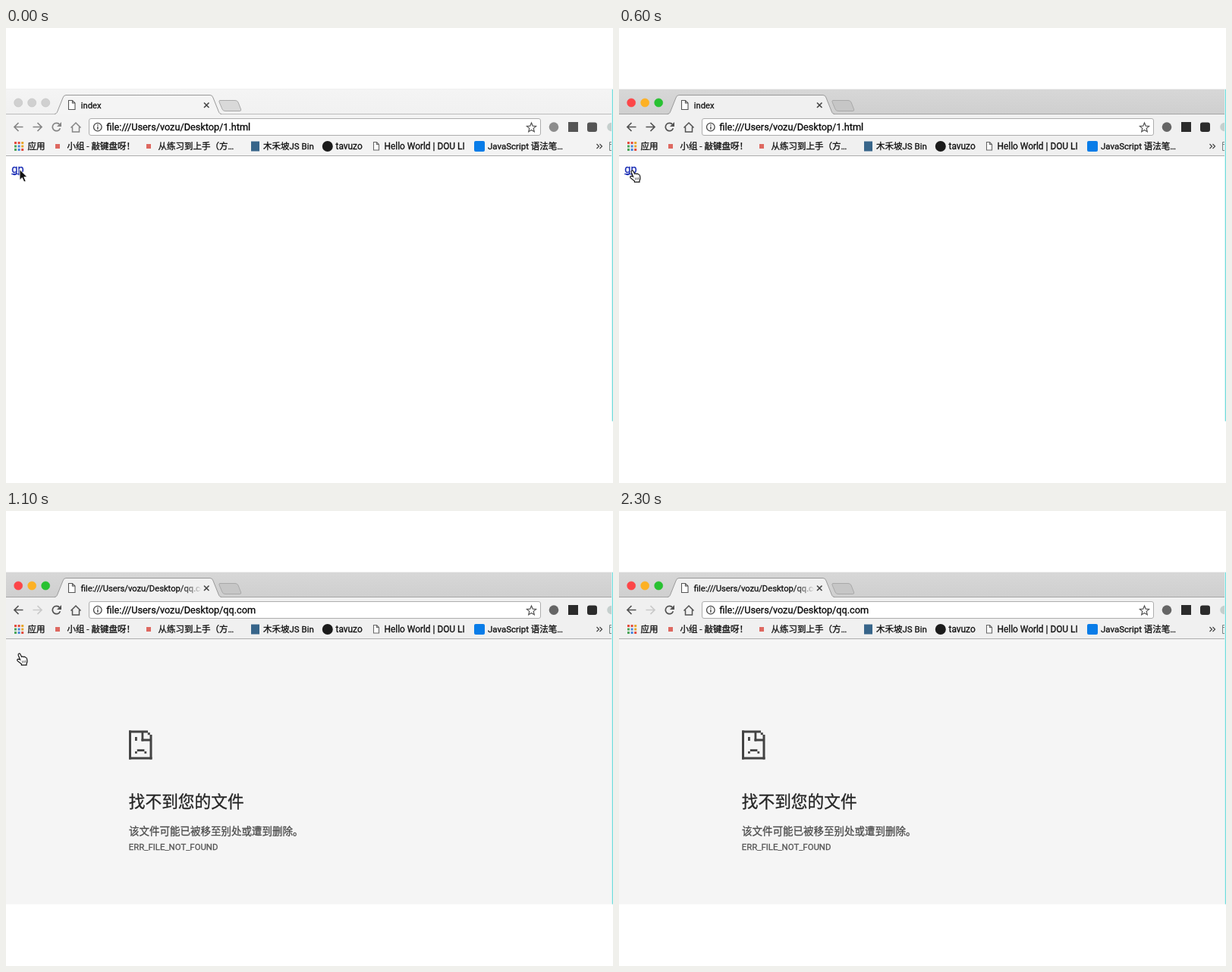
An HTML page with a canvas that plays this animation: 800 px wide and 600 px high, repeating every 2400 ms.

```html
<!DOCTYPE html>
<html lang="zh-CN">
<head>
<meta charset="utf-8">
<title>index</title>
<style>
html, body { margin: 0; width: 100%; height: 100%; overflow: hidden; background: #fff; }
canvas { display: block; }
</style>
</head>
<body>
<canvas id="stage" width="800" height="600"></canvas>
<script>
const ctx = document.getElementById('stage').getContext('2d');
const LOOP = 2400;
const SANS = 'Roboto, "Noto Sans CJK SC", "Noto Sans CJK", "Noto Sans CJK JP", sans-serif';

// Event times in ms
const AT = { press: 100, release: 600, error: 900, title: 1000, hide: 2300 };

function rect(x, y, w, h, color) {
  ctx.fillStyle = color;
  ctx.fillRect(x, y, w, h);
}

// A hairline stroke gives the slightly heavy look of system text
function text(str, x, y, size, color = '#111') {
  ctx.font = `${size}px ${SANS}`;
  ctx.fillStyle = ctx.strokeStyle = color;
  ctx.lineWidth = 0.3;
  ctx.fillText(str, x, y);
  ctx.strokeText(str, x, y);
}

function shape(path, fill, stroke, width = 1) {
  const p = new Path2D(path);
  if (fill) { ctx.fillStyle = fill; ctx.fill(p); }
  if (stroke) { ctx.strokeStyle = stroke; ctx.lineWidth = width; ctx.stroke(p); }
}

function circle(x, y, r, fill, stroke, width = 1) {
  ctx.beginPath();
  ctx.arc(x, y, r, 0, Math.PI * 2);
  if (fill) { ctx.fillStyle = fill; ctx.fill(); }
  if (stroke) { ctx.strokeStyle = stroke; ctx.lineWidth = width; ctx.stroke(); }
}

function box(x, y, w, h, r, fill, stroke) {
  ctx.beginPath();
  ctx.roundRect(x, y, w, h, r);
  if (fill) { ctx.fillStyle = fill; ctx.fill(); }
  if (stroke) { ctx.strokeStyle = stroke; ctx.lineWidth = 1; ctx.stroke(); }
}

function page(x, y, w, h, color) {
  const f = w * 0.42;
  shape(`M${x} ${y}h${w - f}l${f} ${f}v${h - f}h${-w}z M${x + w - f} ${y}v${f}h${f}`, '#fff', color, 1.1);
}

function tabBar(active, title) {
  const g = ctx.createLinearGradient(0, 81, 0, 114);
  g.addColorStop(0, active ? '#d7d7d7' : '#f4f4f4');
  g.addColorStop(1, active ? '#cfcfcf' : '#f1f1f1');
  rect(0, 81, 800, 33, g);
  rect(0, 113, 800, 1, active ? '#a5a5a5' : '#bdbdbd');

  const lights = active ? ['#fc4648', '#fdb124', '#28c131'] : ['#d0d0d0', '#d0d0d0', '#d0d0d0'];
  lights.forEach((c, i) => circle(16.2 + 18 * i, 98.5, 5.5, c, active ? c : '#c2c2c2', 0.6));

  shape('M64 114C67 113 67.5 111 69 107L75 92Q76 88.5 79 88.5H269Q272 88.5 273 92L279 107C280.5 111 281 113 284 114z',
    active ? '#f0f0f0' : '#f4f4f4');
  shape('M64 113.5C67 113 67.5 111 69 107L75 92Q76 88.5 79 88.5H269Q272 88.5 273 92L279 107C280.5 111 281 113 284 113.5',
    null, '#999');
  shape('M282 95.5H302Q305 95.5 306 98L309.5 107Q310.5 109.5 308 109.5H289Q286 109.5 285 107L281 97.5Q280.5 95.5 282 95.5z',
    active ? '#c6c6c6' : '#d9d9d9', '#a9a9a9');

  page(82.5, 95.5, 8.5, 12, '#555');
  const fade = ctx.createLinearGradient(228, 0, 258, 0);
  fade.addColorStop(0, '#111');
  fade.addColorStop(1, 'rgba(17,17,17,0)');
  ctx.save();
  ctx.beginPath();
  ctx.rect(95, 90, 162, 22);
  ctx.clip();
  text(title, 98.8, 105.5, 11.2, fade);
  ctx.restore();
  shape('M261 98.5l6.5 6.5m0-6.5l-6.5 6.5', null, '#444', 1.6);
}

function navBar(active, url, canForward) {
  rect(0, 114, 800, 54, active ? '#f0f0f0' : '#f3f3f3');
  rect(0, 168, 800, 1, '#adadad');
  const ink = active ? '#525252' : '#858585';

  shape('M22.5 130.5H11.5M16.5 125l-5.5 5.5l5.5 5.5', null, ink, 1.7);
  shape('M35.5 130.5H46.5M41.5 125l5.5 5.5l-5.5 5.5', null, canForward ? ink : '#c9c9c9', 1.7);
  ctx.beginPath();
  ctx.arc(66.5, 130.5, 5.2, 0.35, 5.5);
  ctx.strokeStyle = ink;
  ctx.lineWidth = 1.7;
  ctx.stroke();
  shape('M73 124v6h-6z', ink);
  shape('M85.5 131.5L92 125l6.5 6.5M87.5 130.5v6.5h9v-6.5', null, ink, 1.5);

  box(109.5, 119.5, 595, 22, 2.5, '#fff', '#adadad');
  circle(120.8, 130.6, 5.3, null, '#444', 1.3);
  rect(120.2, 129.8, 1.4, 4, '#444');
  rect(120.2, 127.2, 1.4, 1.5, '#444');
  text(url, 132.5, 135, 12.7, '#080808');
  shape('M692.5 125l1.7 4.1l4.4 .4l-3.4 2.9l1.1 4.4l-3.8-2.4l-3.8 2.4l1.1-4.4l-3.4-2.9l4.4-.4z', null, '#555', 1.2);

  const dark = active ? '#2b2b2b' : '#555';
  circle(722, 130.6, 6.3, active ? '#656565' : '#8c8c8c');
  rect(741, 124, 13, 13, dark);
  box(766, 124.5, 13, 12.5, 3, dark);
  circle(798, 130.5, 5.8, '#c5cfcd');
}

function bookmarks() {
  const dots = ['#e34b3d', '#e34b3d', '#e7a62c', '#4ca65a', '#4587dc', '#e7a62c', '#4ca65a', '#4587dc', '#e34b3d'];
  dots.forEach((c, i) => rect(11 + (i % 3) * 4.6, 150 + Math.floor(i / 3) * 4.5, 3, 3, c));
  box(65, 153, 6, 6, 0, '#de6860');
  box(185, 153, 6, 6, 0, '#de6860');
  box(323, 149.5, 11, 13, 0, '#37658a');
  circle(423.8, 156, 7, '#1b1b1b');
  page(484.5, 150.5, 7, 10.5, '#666');
  box(617, 149, 14, 14, 2, '#087ce8');

  const items = [
    ['应用', 28.5], ['小组 - 敲键盘呀！', 80.5], ['从练习到上手（方…', 200.5],
    ['木禾坡JS Bin', 339], ['tavuzo', 434.5, 11.9],
    ['Hello World | DOU LI', 498.5, 11.9], ['JavaScript 语法笔…', 635]
  ];
  for (const [label, x, size = 11.5] of items) text(label, x, 159.8, size);
  shape('M778.5 153l3 3l-3 3m4-6l3 3l-3 3', null, '#444', 1.2);
  shape('M801 150.5H795.5V161.5H801M795.5 153.5H801', '#e9eeee', '#7d8585');
}

function errorPage() {
  rect(0, 169, 800, 349.5, '#f5f5f5');
  const c = '#434343';
  // Sad sheet icon, built from blocks: x, y, w, h
  [
    [162, 289.5, 25, 3], [162, 289.5, 3, 38], [162, 324.5, 30.5, 3], [189.5, 295, 3, 32.5],
    [186.8, 292.2, 3, 3], [178.5, 292, 2.8, 11.5], [178.5, 300.5, 12, 3], [170, 298, 2.8, 5],
    [172.8, 314.2, 9.6, 2.8], [170, 317, 2.8, 2.8], [182.4, 317, 2.8, 2.8]
  ].forEach(b => rect(...b, c));
  text('找不到您的文件', 161.8, 391, 21.7, '#252525');
  text('该文件可能已被移至别处或遭到删除。', 162, 427, 13.5, '#4c4c4c');
  text('ERR_FILE_NOT_FOUND', 161.8, 447, 11.4, '#555');
}

function link() {
  text('gp', 7.2, 191, 14.6, '#1c2fb5');
  rect(7, 192, 17, 1, '#1c2fb5');
}

function arrow() {
  shape('M18 186.5V200.5L21.3 197.5L23.8 203L26.2 202L23.8 196.6H28z', '#111', '#fff', 0.9);
}

function hand() {
  shape('M18.6 196L16.2 190.2Q15.8 188.4 17.1 188Q18.5 187.6 19.1 189.2L20.6 192.4Q22 191.2 23 192.5Q24.6 191.6 25.5 193Q27.3 192.8 27.6 195L28 198Q28 200 27 201.4V203.2H20.4V201.8L15.2 197.6Q14.3 196 15.6 195.4Q17 195 18.6 196z',
    '#fff', '#151515', 1.2);
  shape('M21.5 197.5l.3 3m1.8-3.2l.3 3m1.8-3.2l.3 3', null, '#333', 0.8);
}

function draw(t) {
  const active = t >= AT.press, failed = t >= AT.error;
  const base = 'file:///Users/vozu/Desktop/';
  const failUrl = base + 'qq.com';

  rect(0, 0, 800, 600, '#fff');
  rect(0, 80.5, 800, 1, '#e4e4e4');
  tabBar(active, t >= AT.title ? failUrl : 'index');
  navBar(active, failed ? failUrl : base + '1.html', !failed);
  bookmarks();
  if (failed) errorPage();
  else link();
  rect(798, 81, 1, 437.5, '#d4f3f3');
  rect(799, 81, 1, 437.5, '#72dcdc');

  if (active && t < AT.release) circle(19, 188.3, 17.8, null, '#0b0b0b', 2.8);
  if (t < AT.release) arrow();
  else if (t < AT.hide) hand();
}

const start = performance.now();
function tick() {
  draw((performance.now() - start) % LOOP);
  requestAnimationFrame(tick);
}
tick();
</script>
</body>
</html>
```
